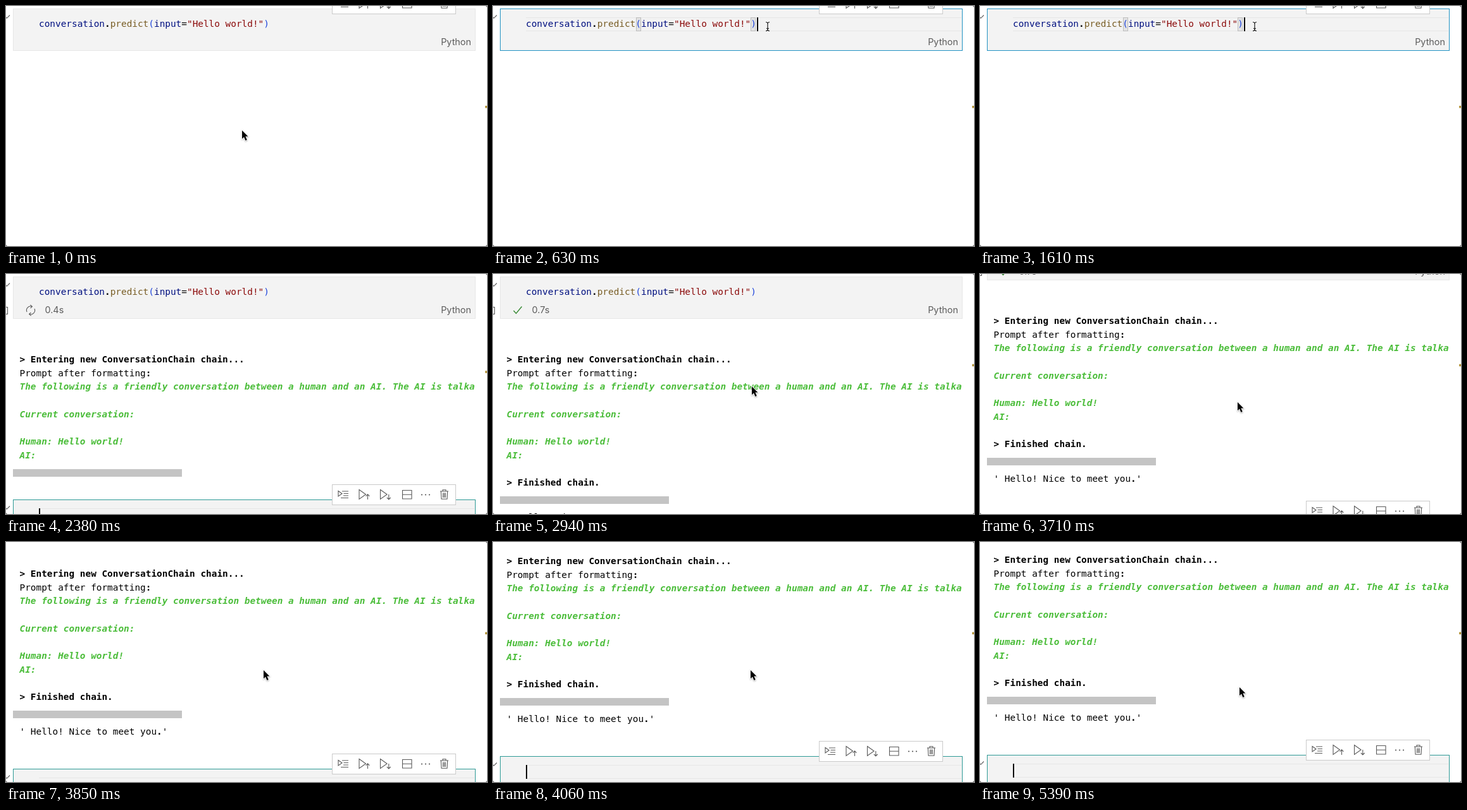
Animation, 760 px wide and 380 px high, one loop 5460 ms. Source, as an HTML page:

```html
<!DOCTYPE html>
<html lang="en">
<head>
<meta charset="utf-8">
<title>Notebook run</title>
<style>
  html, body { margin: 0; width: 100%; height: 100%; overflow: hidden; background: #fff; }
  svg { display: block; width: 760px; height: 380px; }
  text { white-space: pre; font-size: 14.4px; }
  .mono { font-family: "DejaVu Sans Mono", monospace; }
  .ui { font-family: Inter, "Liberation Sans", sans-serif; fill: #5c5c5c; }
  .bold, .prompt { font-weight: bold; }
  .prompt { font-style: italic; fill: #4bbd3a; }
  .name { fill: #001080; }
  .call { fill: #795e26; }
  .paren { fill: #1f45dc; }
  .str { fill: #8b0a0a; }
  .line { fill: none; stroke: #5a5a5a; stroke-width: 1.1; }
  .cell { fill: #f3f3f3; }
  .guide { fill: none; stroke: #e6e6e6; }
</style>
</head>
<body>
<svg viewBox="0 0 760 380" xmlns="http://www.w3.org/2000/svg">
  <defs>
    <g id="tools">
      <rect x="515.5" y=".5" width="195" height="32" fill="#fff" stroke="#cacaca"/>
      <g class="line">
        <path d="M525 10.5L531 14.7L525 19ZM531 11H541M533.5 14.5H541M533 18H541M529 21.5H541"/>
        <path id="play" d="M558 8.5L568.5 16L558 23.5Z"/>
        <use href="#play" x="33.5"/>
        <path d="M571.5 24V16M568.6 18.8L571.5 15.8L574.4 18.8"/>
        <path d="M604.8 16V24M601.9 21L604.8 24L607.7 21"/>
        <path d="M626.5 9.5H641V23H626.5ZM626.5 16.3H641"/>
        <path d="M686 11H699M690 11V8.8H695V11M687.3 11L688 23.2H697L697.7 11M690.6 13.5V21M692.5 13.5V21M694.4 13.5V21"/>
      </g>
      <g fill="#5a5a5a">
        <circle cx="657" cy="16.5" r="1.1"/><circle cx="663" cy="16.5" r="1.1"/><circle cx="669" cy="16.5" r="1.1"/>
      </g>
    </g>
    <path id="chevron" class="line" d="M-3 15L1.3 19.3L6 14.5" transform="translate(0 -4)"/>
  </defs>

  <rect width="760" height="380" fill="#fff"/>
  <g id="page">
    <rect id="cell" class="cell" x="11.5" y="4.5" width="730" height="66"/>
    <use href="#chevron" y="4"/>
    <path id="line" class="guide" d="M52 18.5H740M52 39.5H740"/>
    <g id="pair" fill="#e4e4e4" stroke="#bdbdbd">
      <rect x="226.5" y="18.5" width="7" height="21"/>
      <rect x="407.5" y="18.5" width="7" height="21"/>
    </g>
    <text class="mono" x="52" y="33"><tspan class="name">conversation</tspan><tspan class="bold">.</tspan><tspan class="call">predict</tspan><tspan class="paren">(</tspan><tspan class="name">input</tspan>=<tspan class="str">"Hello world!"</tspan><tspan class="paren">)</tspan></text>
    <rect id="caret" x="417" y="18" width="2" height="22"/>
    <text class="ui" x="735" y="62" text-anchor="end">Python</text>
    <use id="topTools" href="#tools" y="-20"/>

    <g id="status">
      <path class="line" d="M-1 52.5H2.5V63.5H-1"/>
      <g id="spin" class="line">
        <path d="M-6 2.5A6.4 6.4 0 0 1 2 -6.1M6 -2.5A6.4 6.4 0 0 1 -2 6.1"/>
        <path d="M-.6 -8.6L2.4 -6L-.4 -3.4M.6 8.6L-2.4 6L.4 3.4"/>
      </g>
      <path id="tick" d="M32.5 58L36.5 62.5L45.5 51.5" fill="none" stroke="#388a34" stroke-width="1.4"/>
      <text id="timer" class="ui" x="61.5" y="62"></text>
    </g>

    <g id="output" class="mono"></g>
    <rect id="bar" x="11" width="267" height="12" fill="#c4c4c4"/>
    <text id="result" class="mono" x="21.5" y="390">' Hello! Nice to meet you<tspan class="bold">.</tspan>'</text>

    <g id="next">
      <rect class="cell" x="11.5" y=".5" width="730" height="66" stroke="#2d9a96"/>
      <path class="guide" d="M52 14.5H740M52 35.5H740"/>
      <use href="#chevron"/>
      <rect id="nextCaret" x="52" y="14" width="2" height="22"/>
      <use href="#tools" y="-24"/>
    </g>
  </g>

  <rect id="mark" x="757" width="3" height="3.5" fill="#b7983f"/>
  <path d="M758 0H760V2ZM0 378V380H2ZM760 378V380H758Z" fill="#777"/>

  <path id="arrow" d="M0 0V13.2L3 10.5L5.4 16L7.8 15L5.4 9.6L9.5 9.4Z" stroke="#fff" stroke-width="1.6" paint-order="stroke" style="filter:drop-shadow(0 1px 1px rgba(0,0,0,.3))"/>
  <g id="beam" fill="none">
    <path id="beamShape" d="M-3 -6.5Q0 -6.5 0 -4V5Q0 7.5 -3 7.5M3 -6.5Q0 -6.5 0 -4M0 5Q0 7.5 3 7.5M-2 3.5H2" stroke="#fff" stroke-width="3"/>
    <use href="#beamShape" style="display:none"/>
    <path d="M-3 -6.5Q0 -6.5 0 -4V5Q0 7.5 -3 7.5M3 -6.5Q0 -6.5 0 -4M0 5Q0 7.5 3 7.5M-2 3.5H2" stroke="#111" stroke-width="1.2"/>
  </g>
</svg>
<script>
const LOOP = 5460, STEP = 70;
const FOCUS = 560, CLICK = 630, RUN = 1820, START = 1890, PRINT = 2170, DONE = 2660, MOVE = 2730;
const $ = id => document.getElementById(id);
const show = (id, on) => $(id).style.display = on ? "" : "none";
const place = (id, x, y, extra = "") => $(id).setAttribute("transform", `translate(${x} ${y})${extra}`);

// Output lines: row, style, text
const lines = [
  [0, "bold", "> Entering new ConversationChain chain..."],
  [1, "", 'Prompt after formatting<tspan class="bold">:</tspan>'],
  [2, "prompt", "The following is a friendly conversation between a human and an AI. The AI is talka"],
  [4, "prompt", "Current conversation:"],
  [6, "prompt", "Human: Hello world!"],
  [7, "prompt", "AI:"],
  [9, "bold", "> Finished chain."]
];
$("output").innerHTML = lines.map(([row, style, text]) =>
  `<text class="${style}" x="21.5" y="${140 + row * 21.67}">${text}</text>`).join("");
const finished = $("output").lastElementChild;

// Linear interpolation over [time, ...values] keys
function track(keys, t) {
  let i = keys.findIndex(k => k[0] > t);
  if (i < 0) return keys[keys.length - 1].slice(1);
  if (i === 0) return keys[0].slice(1);
  const a = keys[i - 1], b = keys[i], p = (t - a[0]) / (b[0] - a[0]);
  return a.slice(1).map((v, n) => v + (b[n + 1] - v) * p);
}

const scrollKeys = [[3430, 0], [3500, 19], [3710, 61], [3850, 85], [3920, 94], [3990, 100], [4060, 105], [4130, 107]];
const pointerKeys = [[2730, 430, 40], [2800, 423, 86], [2870, 414, 134], [2940, 409, 178], [3010, 407, 203], [5320, 407, 203], [5390, 410, 230]];

function pointer(t) {
  if (t >= MOVE) return track(pointerKeys, t);
  if (t >= CLICK) return [434, 32];
  const p = Math.min(t / FOCUS, 1), e = p * p * (3 - 2 * p);
  return [373 + 72 * e, 197 - 158 * e];
}

function draw(t) {
  const focused = t >= FOCUS && t < RUN, ran = t >= RUN;
  const printed = t >= PRINT, done = t >= DONE;
  place("page", 0, -Math.round(track(scrollKeys, t)[0]));

  $("cell").setAttribute("stroke", focused ? "#2292c3" : "#e7e7e7");
  show("line", focused);
  show("pair", t >= CLICK && !ran);
  show("caret", t >= CLICK && !ran && (t < 1050 || t >= 1610));
  show("topTools", !ran);

  show("status", t >= START);
  show("spin", !done);
  show("tick", done);
  place("spin", 39, 57.5, ` rotate(${(t - 2380) * 0.24})`);
  const secs = Math.min(Math.max(t - 1980, 0), 700) / 1000;
  $("timer").textContent = (Math.floor(secs * 10 + 1e-6) / 10).toFixed(1) + "s";

  show("output", printed);
  finished.style.display = done ? "" : "none";
  show("bar", printed);
  $("bar").setAttribute("y", done ? 352 : 309);
  show("result", done);

  show("next", ran);
  place("next", 0, done ? 444 : printed ? 357 : 99);
  show("nextCaret", t < 3000 || Math.floor((t - 4060) / 490) % 2 === 0);
  $("mark").setAttribute("y", done ? 142.7 : ran ? 153.3 : 158);

  const [x, y] = pointer(t), inText = t < RUN && y < 71;
  show("beam", inText);
  show("arrow", !inText && (t < RUN || t >= MOVE));
  place("beam", x, y);
  place("arrow", x, y);
}

const begin = performance.now();
function tick() {
  const t = (performance.now() - begin) % LOOP;
  draw(Math.floor(t / STEP) * STEP);
  requestAnimationFrame(tick);
}
tick();
</script>
</body>
</html>
```
